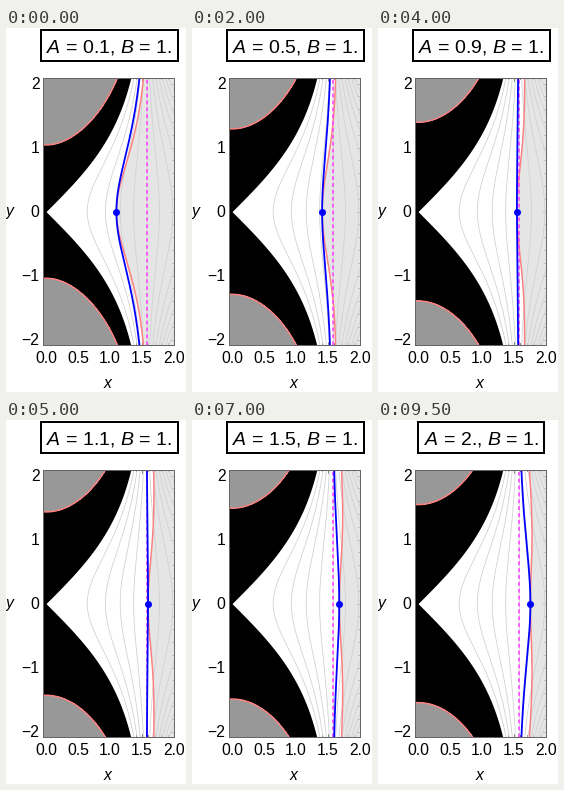
Write a matplotlib script that moves like this. It is 180 by 364 pixels and loops after 10000 ms.

```python
import numpy as np
import matplotlib.pyplot as plt
from matplotlib.animation import FuncAnimation
from matplotlib.patches import Rectangle

WIDTH, HEIGHT, DPI = 180, 364, 100
LEFT, RIGHT, TOP, BOTTOM = 36.5, 167.5, 49.5, 316.5   # plot frame, in pixels
ORIGIN_X, ORIGIN_Y, UNIT = 40.0, 183.6, 64.0          # data origin and scale
FRAMES, INTERVAL = 20, 500
B = 1.0

plt.rcParams.update({
    "font.family": "Liberation Sans",
    "mathtext.fontset": "custom",
    "mathtext.rm": "Liberation Sans",
    "mathtext.it": "Liberation Sans:italic",
})


def px(size):
    """Pixels to points."""
    return size * 72 / DPI


fig = plt.figure(figsize=(WIDTH / DPI, HEIGHT / DPI), dpi=DPI, facecolor="white")

stage = fig.add_axes([0, 0, 1, 1])
stage.set(xlim=(0, WIDTH), ylim=(HEIGHT, 0))
stage.axis("off")

plot = fig.add_axes([LEFT / WIDTH, 1 - BOTTOM / HEIGHT,
                     (RIGHT - LEFT) / WIDTH, (BOTTOM - TOP) / HEIGHT])
plot.set(xlim=((LEFT - ORIGIN_X) / UNIT, (RIGHT - ORIGIN_X) / UNIT),
         ylim=((ORIGIN_Y - BOTTOM) / UNIT, (ORIGIN_Y - TOP) / UNIT))
plot.patch.set_alpha(0)

# Harmonic field phi = B - Re(cos z) and the size of its gradient
xs = np.linspace(-0.1, 2.1, 260)
ys = np.linspace(-2.2, 2.2, 441)
X, Y = np.meshgrid(xs, ys)
PHI = B - np.cos(X) * np.cosh(Y)
GRADIENT = np.sqrt(np.cosh(Y) ** 2 - np.cos(X) ** 2)


def level_curve(c):
    """x(y) on the curve cos x cosh y = c."""
    return np.arccos(np.clip(c / np.cosh(ys), -1, 1))


def critical_x(a):
    """Root of a sin x = phi^4 on the axis y = 0."""
    x = np.linspace(0.3, 2.6, 4000)
    return np.interp(a, (B - np.cos(x)) ** 4 / np.sin(x), x)


def label(x, y, text, **style):
    style = {"size": px(15.8), "ha": "center", "va": "baseline", **style}
    return stage.text(x, y, text, **style)


def draw_ticks():
    plot.tick_params(bottom=False, left=False, labelbottom=False, labelleft=False)
    style = dict(color="0.4", lw=px(0.8), zorder=9)
    for spine in plot.spines.values():
        spine.set(color="0.4", linewidth=px(1), zorder=9)
    for i in range(21):
        x, size = ORIGIN_X + i * 0.1 * UNIT, 3 if i % 5 == 0 else 1.6
        stage.plot([x, x], [TOP, TOP + size], **style)
        stage.plot([x, x], [BOTTOM, BOTTOM - size], **style)
    for i in range(-10, 11):
        y, size = ORIGIN_Y - i * 0.2 * UNIT, 3 if i % 5 == 0 else 1.6
        stage.plot([LEFT, LEFT + size], [y, y], **style)
        stage.plot([RIGHT, RIGHT - size], [y, y], **style)
    for i in range(5):
        label(ORIGIN_X + i * 0.5 * UNIT, 335.2, f"{i / 2:.1f}")
    for n in range(-2, 3):
        label(33.6, ORIGIN_Y - n * UNIT + 5.6, str(n).replace("-", "\u2212"), ha="right")
    label(102, 359.5, "x", style="italic")
    label(4.2, 188, "y", style="italic")


def draw_field():
    plot.fill_betweenx(ys, -1, level_curve(1), color="black", lw=0, zorder=1)
    for c in np.arange(0.8, -1.5, -0.2):
        plot.plot(level_curve(c), ys, color="0.82", lw=px(0.8), zorder=3)
    plot.plot([np.pi / 2] * 2, [-2.2, 2.2], color="#ff40ff", lw=px(1.6),
              dashes=(2.4, 1.9), dash_capstyle="butt", zorder=5)


draw_ticks()
draw_field()
blue, = plot.plot([], [], color="blue", lw=px(1.8), zorder=6)
dot, = plot.plot([], [], "o", color="blue", ms=px(7), mew=0, zorder=7)
title = label(103, 24.7, "", size=px(19.5))
box = stage.add_patch(Rectangle((35, 2), 136, 31, fill=False, ec="black", lw=px(2)))
regions = []


def update(frame):
    a = (frame + 1) / 10
    while regions:
        regions.pop().remove()
    excess = a * GRADIENT - PHI ** 4
    regions.append(plot.contourf(X, Y, excess, levels=[-1e6, 0],
                                 colors=[(0.855, 0.855, 0.855, 0.7)], zorder=2))
    regions.append(plot.contour(X, Y, excess, levels=[0], colors=["#ff8080"],
                                linewidths=px(1.5), zorder=4))

    x0 = critical_x(a)
    blue.set_data(level_curve(np.cos(x0)), ys)
    dot.set_data([x0], [0])

    whole = (frame + 1) % 10 == 0
    value = f"{a:.0f}." if whole else f"{a:.1f}"
    title.set_text(f"$A$ = {value}, $B$ = {B:.0f}.")
    half = 63 if whole else 68.5
    box.set_x(103 - half)
    box.set_width(2 * half)
    return blue, dot, title, box


anim = FuncAnimation(fig, update, frames=FRAMES, interval=INTERVAL,
                     repeat=True, repeat_delay=0, blit=False)
plt.show()
```
